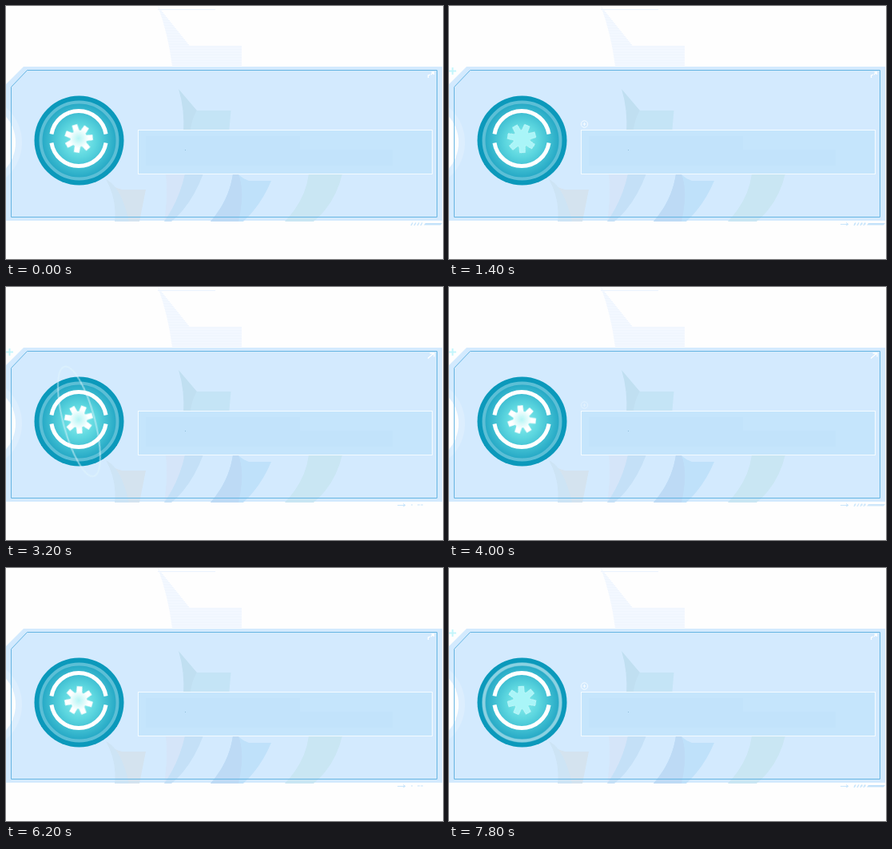
An HTML page for the animation above (8000 ms loop, 547 px wide and 317 px high).

```html
<!DOCTYPE html>
<html lang="en">
<head>
<meta charset="utf-8">
<title>Panel with rotating gear</title>
<style>
html, body { margin: 0; width: 100%; height: 100%; overflow: hidden; background: #fefefe; }
svg { display: block; width: 100vw; height: 100vh; }

/* Every animation is paused and scrubbed through --t, in 200 ms steps. */
.anim {
  animation: var(--name) var(--dur, 8s) linear infinite both paused;
  animation-delay: calc(var(--start, 0s) - var(--t, 0) * 1ms);
}
.gear { --name: spin; }
.tint { --name: tint; --dur: 3.2s; }
.icon { --name: icon; --dur: 3.2s; }
.arcs { --name: arcs; --dur: 2.2s; --start: 1.8s; }
.orbit { --name: orbit; --dur: 2.2s; --start: 1.8s; }
.orbit ellipse { vector-effect: non-scaling-stroke; }
.plus { --name: plus; }
.tail { --name: tail; }
.bar { --name: bar; }
.halo { --name: halo; }
.split { --name: split; }
.whole { --name: whole; }

@keyframes spin { from { transform: rotate(-17deg); } to { transform: rotate(209deg); } }
@keyframes tint { 0%, 30% { opacity: 0; } 43%, 46% { opacity: 1; } 58%, 100% { opacity: 0; } }
@keyframes icon { 0%, 15% { opacity: 0; } 37%, 50% { opacity: 1; } 62%, 100% { opacity: 0; } }
@keyframes arcs {
  0% { transform: rotate(0deg); }
  18.2% { transform: rotate(-47deg); }
  40% { transform: rotate(-150deg); }
  54%, 100% { transform: rotate(-180deg); }
}
@keyframes orbit {
  0% { opacity: 0; transform: rotate(0deg) scale(23, 40); }
  18.2% { opacity: .5; transform: rotate(0deg) scale(22, 46); }
  63.6% { opacity: .7; transform: rotate(-15deg) scale(19.7, 71); }
  72%, 100% { opacity: 0; transform: rotate(-18deg) scale(19, 78); }
}
@keyframes plus { 0%, 8% { opacity: 0; } 17%, 61% { opacity: 1; } 72%, 82% { opacity: 0; } 95%, 100% { opacity: 1; } }
@keyframes tail { 0%, 6% { opacity: 0; } 13%, 100% { opacity: 1; } }
@keyframes bar { 0%, 20% { opacity: 1; } 26%, 42% { opacity: 0; } 52%, 62% { opacity: 1; } 74%, 88% { opacity: 0; } 96%, 100% { opacity: 1; } }
@keyframes halo { 0%, 88% { opacity: 0; } 97%, 100% { opacity: .3; } }
@keyframes split { 0%, 29.9% { opacity: 1; } 30%, 62% { opacity: 0; } 62.1%, 100% { opacity: 1; } }
@keyframes whole { 0%, 29.9% { opacity: 0; } 30%, 62% { opacity: 1; } 62.1%, 100% { opacity: 0; } }
</style>
</head>
<body>
<svg viewBox="0 0 547 317">
  <defs>
    <radialGradient id="discFill">
      <stop offset="0" stop-color="#8cefee"/>
      <stop offset=".45" stop-color="#5cd6df"/>
      <stop offset="1" stop-color="#25a8c5"/>
    </radialGradient>
    <radialGradient id="gearFill" gradientUnits="userSpaceOnUse" cx="0" cy="0" r="18">
      <stop offset="0" stop-color="#b5f5f5"/>
      <stop offset=".7" stop-color="#fff"/>
    </radialGradient>
    <pattern id="hatch" width="4" height="2" patternUnits="userSpaceOnUse">
      <rect width="4" height="2" fill="#f8fbff"/>
      <rect width="4" height="1" fill="#ebf3fe"/>
    </pattern>
    <clipPath id="panelShape"><path d="M22 76H546V270H0V98Z"/></clipPath>
  </defs>

  <rect width="547" height="317" fill="#fefefe"/>

  <!-- tower above the panel -->
  <path d="M190 0Q214 30 230 50H295V75H208Q203 35 190 0Z" fill="url(#hatch)"/>
  <path d="M190 4.500H262" stroke="#eaf2fe"/>

  <!-- panel -->
  <g clip-path="url(#panelShape)">
    <rect y="76" width="546" height="193" fill="#d3eafe"/>
    <path d="M239 131H281.500L279 160H222Z" fill="#c4e4f6"/>
    <path d="M216 104L239 131Q232 142 230 160H222Q224 130 216 104Z" fill="#c0dff1"/>
    <path d="M125 217Q134 228 145 230H175L167 270H151Q144 239 125 217Z" fill="#d4e3ef"/>
    <path d="M125 217Q144 226 154 270H136Q139 242 125 217Z" fill="#cde4f5"/>
    <path d="M200 210H228Q217 242 198 270Q203 240 200 210Z" fill="#d5e5f9"/>
    <path d="M224 210H247Q232 250 207 270H198Q217 243 224 210Z" fill="#c4e0f7"/>
    <path d="M285 200Q289 214 304 219H332Q319 250 297 270H256Q283 239 285 200Z" fill="#bfe1fa"/>
    <path d="M285 200Q302 222 291 270H256Q283 239 285 200Z" fill="#bddaf5"/>
    <path d="M379 210H421Q412 248 385 270H349Q375 243 379 210Z" fill="#c9e6f3"/>
    <circle cx="-38" cy="171" r="58" fill="#dceefe"/>
    <circle cx="-38" cy="171" r="50" fill="#fefefe"/>
    <path d="M26.500 80.500H539.500V264.500H6.500V101.500Z" fill="none" stroke="#66b5e2"/>
  </g>

  <!-- field -->
  <rect x="165.500" y="155.500" width="368" height="55" fill="#c5e5fc" stroke="#f4fbff"/>
  <path d="M175 163H368V180H484V200H175Z" fill="#c2e3fb"/>
  <rect x="224" y="180" width="1" height="1" fill="#8fbdd9"/>
  <g class="anim icon" fill="none" stroke="#f6fcff">
    <circle cx="169.500" cy="148" r="4.200"/>
    <path d="M167.500 148H171.500M169.500 146V150"/>
  </g>

  <!-- disc -->
  <g transform="translate(91.500 168.500)">
    <circle r="56" fill="#0b99bb"/>
    <circle r="47" fill="url(#discFill)"/>
    <circle r="48" fill="none" stroke="#5cbfd6" stroke-width="4"/>
    <circle class="anim halo" r="48" fill="none" stroke="#fff" stroke-width="4"/>
    <g class="anim orbit">
      <ellipse rx="1" ry="1" fill="none" stroke="#e2f6fd" stroke-opacity=".75" stroke-width="2"/>
    </g>
  </g>
  <g transform="translate(91 166)">
    <circle class="anim arcs" r="34.500" fill="none" stroke="#fff" stroke-width="5"
      pathLength="360" stroke-dasharray="161.500 18.500" stroke-dashoffset="-9.250"/>
    <g class="anim gear">
      <path class="cog" fill="url(#gearFill)"/>
      <path class="cog anim tint" fill="#a9f5f8"/>
    </g>
  </g>

  <!-- corner marks -->
  <path class="anim plus" d="M0 81.500H9M4.500 77V86" stroke="#c4f5fb" stroke-width="2"/>
  <g fill="none" stroke="#fff" stroke-width="1.300">
    <path class="anim split" d="M528.500 90V87L531 86M532 86L535 83M532.500 83H535.500V86"/>
    <path class="anim whole" d="M528 89.500L535.500 83M530.500 83H536V87.500"/>
  </g>
  <g stroke="#c8e5fb" fill="none">
    <path class="anim tail" d="M490 273.500H500M497 271.500L500 273.500L497 275M507 273H509M515 273H518M519 273H522"/>
    <g class="anim bar">
      <path d="M507 275L509 271.500M511 275L513 271.500M515 275L517 271.500M519 275L521 271.500" stroke-width="1.500"/>
      <path d="M525 272H546L544 274.500H523Z" fill="#c3e2fa" stroke="none"/>
    </g>
  </g>
</svg>
<script>
const LOOP = 8000, STEP = 200, TEETH = 7;

const polar = (radius, degrees) => {
  const a = degrees * Math.PI / 180;
  return `${(radius * Math.sin(a)).toFixed(2)} ${(-radius * Math.cos(a)).toFixed(2)}`;
};

const cogPoints = Array.from({ length: TEETH }, (_, i) => {
  const mid = i * 360 / TEETH;
  return [[10.5, -20], [18, -11], [18, 11], [10.5, 20]].map(([r, d]) => polar(r, mid + d));
}).flat();
document.querySelectorAll('.cog').forEach(cog => cog.setAttribute('d', `M${cogPoints.join('L')}Z`));

const start = performance.now();
function tick() {
  const time = (performance.now() - start) % LOOP;
  document.documentElement.style.setProperty('--t', Math.floor(time / STEP) * STEP);
  requestAnimationFrame(tick);
}
tick();
</script>
</body>
</html>
```
